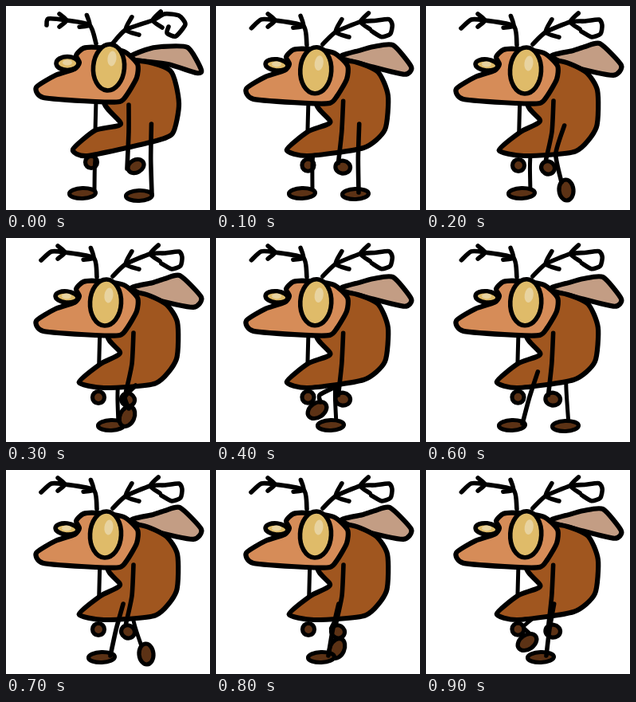
These frames come from a looping animation (256x256 px, 1 s). An HTML page:

```html
<!DOCTYPE html>
<html lang="en">
<head>
<meta charset="utf-8">
<title>Walking fly</title>
<style>
html, body { margin: 0; width: 100%; height: 100%; overflow: hidden; background: #fff; }
svg { display: block; width: 100vw; height: 100vh; stroke: #000; stroke-width: 6.2; stroke-linecap: round; stroke-linejoin: round; }
.step { visibility: hidden; animation: show 1s step-end calc(var(--i) * 100ms) infinite; }
@keyframes show { 0% { visibility: visible; } 10%, 100% { visibility: hidden; } }
.line { fill: none; stroke-width: 5.6; }
.thin { fill: none; stroke-width: 5; }
.head { fill: #d68c58; }
.body { fill: #a0561f; }
.wing { fill: #c39d84; }
.eye { fill: #dfbb69; stroke-width: 5.6; }
.glint { fill: #e8d3a0; stroke: none; }
.foot { fill: #5c3215; stroke-width: 5.2; }
</style>
</head>
<body>
<svg id="stage" viewBox="0 0 256 256"></svg>
<script>
const STEPS = 10;
const HEAD = '38,102 62,87 86,79 92,71 88,62 97,53 115,52 148,57 165,73 164,90 152,111 143,120 112,120 47,115';

// Each part has an upright and a crouched shape
const PARTS = {
  left: ['51,24 53,16 76,18 105,24 113,47', '44,28 57,17 74,18 110,25 114,49'],
  right: ['133,48 150,30 184,18 199,10 217,12 225,23 213,38 202,34 204,26',
    '134,48 150,33 181,20 199,19 217,17 221,24 219,35 208,39 195,32'],
  wing: ['153,66 175,55 195,51 228,52 245,80 239,84 203,73', '157,63 185,56 200,51 218,47 245,74 235,87 189,78'],
  body: ['160,70 206,81 217,122 209,160 181,171 102,188 84,180 112,156 144,148 123,119',
    '162,70 199,82 215,105 214,152 188,183 124,188 92,181 119,158 143,144 128,122']
};

// Push-off and swing of a leg: foot x, foot y, ankle offset, hip height
const SWING = [[167, 238, 16, 148], [175, 236, 4, 148], [176, 231, -6, 150], [152, 224, 2, 185], [127, 216, 4, 188]];

const points = text => text.split(' ').map(s => s.split(',').map(Number));

const blend = ([a, b], k) => {
  const q = points(b);
  return points(a).map((p, i) => p.map((v, j) => v + (q[i][j] - v) * k));
};

// Softly rounded path through the points
function curve(p, closed) {
  const n = p.length, ease = 0.11;
  const at = i => closed ? p[(i + n) % n] : p[Math.max(0, Math.min(n - 1, i))];
  let d = 'M' + p[0];
  for (let i = 0; i < (closed ? n : n - 1); i++) {
    const [a, b, c, e] = [at(i - 1), at(i), at(i + 1), at(i + 2)];
    const c1 = b.map((v, j) => v + (c[j] - a[j]) * ease);
    const c2 = c.map((v, j) => v - (e[j] - b[j]) * ease);
    d += `C${c1} ${c2} ${c}`;
  }
  return d + (closed ? 'Z' : '');
}

const line = (p, cls = 'line') => `<path class="${cls}" d="${curve(p, false)}"/>`;
const shape = (p, cls) => `<path class="${cls}" d="${curve(p, true)}"/>`;
const oval = (cls, x, y, rx, ry, turn = 0) =>
  `<ellipse class="${cls}" cx="${x}" cy="${y}" rx="${rx}" ry="${ry}" transform="rotate(${turn} ${x} ${y})"/>`;

// Two barbs spread around a direction in degrees
function fork([x, y], dir, len) {
  const tip = spread => {
    const a = (dir + spread) * Math.PI / 180;
    return [x + len * Math.cos(a), y + len * Math.sin(a)];
  };
  return line([tip(-42), [x, y], tip(42)]);
}

// A leg at gait step u: planted and sliding back for 5 steps, then pushing off and swinging
function leg(u, near) {
  const [x, y, heel, hipY] = u < 5 ? [96 + 12 * u, 235, 15 - 2 * u, 168] : SWING[u - 5];
  const lifted = u >= 7;
  const ankle = [x + heel, y - (lifted ? 10 : 2)];
  const hip = [near ? ankle[0] * 0.68 + 58 : ankle[0] * 0.9 + 14, hipY];
  const knee = [(hip[0] + ankle[0]) / 2 - (lifted ? 9 : 1), (hipY + ankle[1]) / 2];
  return {
    limb: line([hip, knee, ankle], near ? 'line' : 'thin'),
    foot: lifted ? oval('foot', x, y, 13, 9, 85 + 30 * (u - 7)) : oval('foot', x, y, 16.5, 6.5, -2)
  };
}

function draw(i) {
  const crouch = Math.sin(Math.PI * (i % 5) / 5);
  const dip = Math.min(1, 1.6 * crouch);
  const far = leg(i, false), near = leg((i + 5) % STEPS, true);
  const left = blend(PARTS.left, dip), right = blend(PARTS.right, dip);
  const neck = 113 + 5 * crouch;
  const hand = 163 - 11 * crouch ** 2;
  const tucked = i === 5; // far hand hides behind the body
  return shape(blend(PARTS.wing, crouch), 'wing') +
    (tucked ? '' : oval('foot', 107 + 9 * dip, 196 + 4 * dip, 7.5, 7.5)) +
    far.limb + far.foot + near.foot +
    oval('foot', hand, 201 + 2 * crouch, 10.5 - 2 * crouch, 8, -28 + 60 * crouch) +
    line([[neck, 119], [neck - 1, 157]], 'thin') +
    shape(blend(PARTS.body, crouch), 'body') +
    shape(points(HEAD).map(([x, y]) => [x, y + 2 * dip]), 'head') +
    line(left) + fork(left[2], 180, 12) + fork(left[3], 212, 13) +
    line(right) + fork(right[1], -22, 18) + fork(right[2], -5, 15) +
    oval('eye', 77 - dip, 72 + 2 * dip, 14, 8.5 - 1.5 * dip, 6 * dip) +
    oval('glint', 77 - dip, 71 + 2 * dip, 6, 3.5) +
    oval('eye', 129 - 4 * dip, 77 + 4 * dip, 19.5, 29, 5 - 2 * dip) +
    oval('glint', 133 - 4 * dip, 66 + 6 * dip, 5.5, 9.5, 8) +
    near.limb +
    line([[154 + 6 * dip, 124 - 5 * dip], [154 + 4 * dip, 158], [hand - 11 + 9 * crouch, 204 - 12 * crouch]]);
}

document.getElementById('stage').innerHTML = Array.from({ length: STEPS },
  (_, i) => `<g class="step" style="--i:${i}">${draw(i)}</g>`).join('');
</script>
</body>
</html>
```
